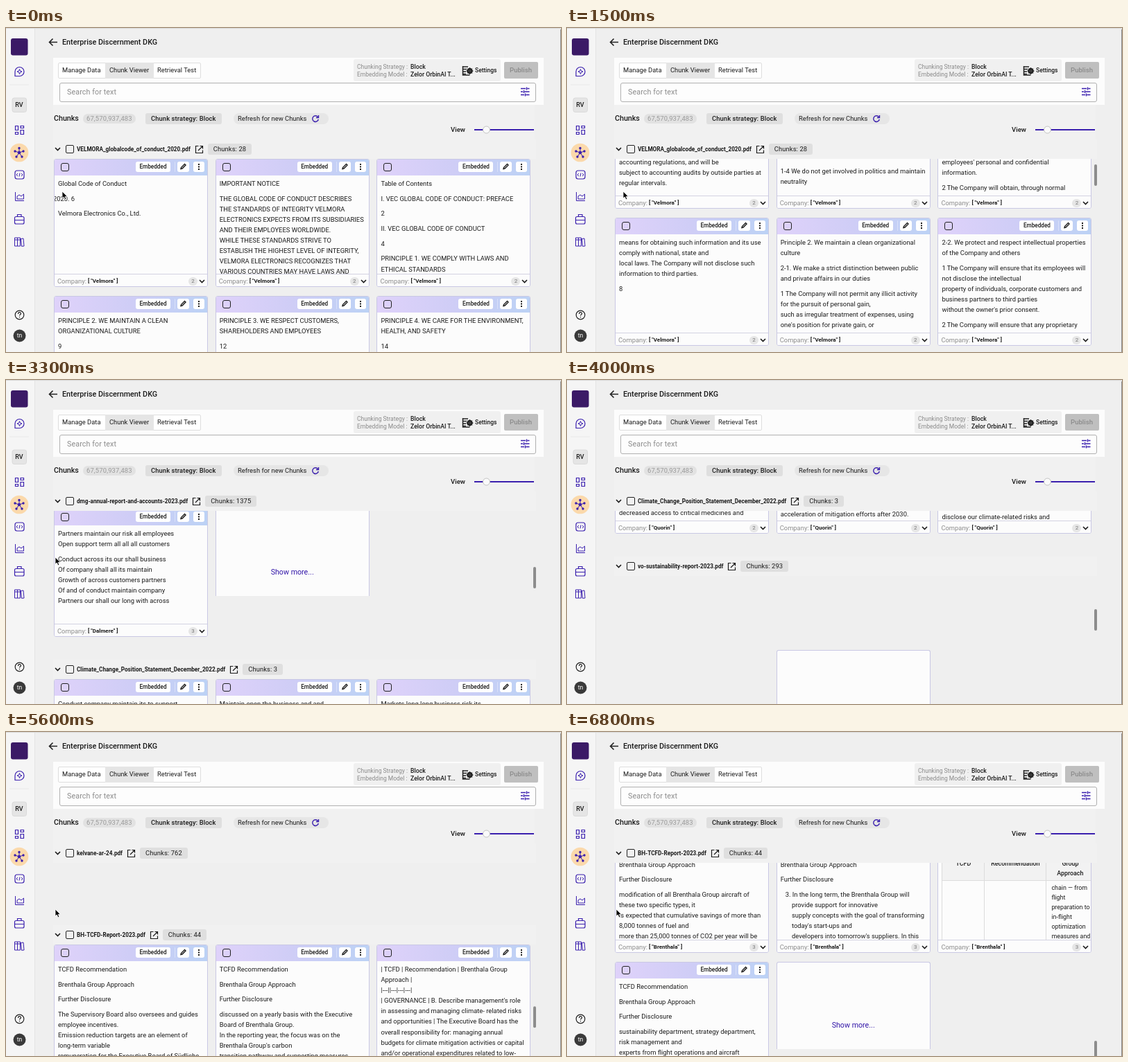
These frames come from a looping animation (800x468 px, 6.9 s). An HTML page:

```html
<!DOCTYPE html>
<html lang="en">
<head>
<meta charset="utf-8">
<title>Chunk viewer</title>
<style>
html, body { margin: 0; width: 100%; height: 100%; overflow: hidden; }
body { position: relative; background: #efefef; color: #1b1b1b; font: 9.4px/12px Roboto, "Open Sans", sans-serif; }
body > *, .box { position: absolute; box-sizing: border-box; white-space: nowrap; }
.m { font-weight: 500; }
.grey { color: #8b8b8b; }
.side { left: 0; top: 0; width: 42px; height: 468px; background: #f5f5f5; border-right: 1px solid #e4e4e4; }
svg { overflow: visible; fill: none; stroke: currentColor; stroke-width: 1.2; }
.art { left: 0; top: 0; width: 800px; height: 468px; }
.view { left: 68px; top: 161px; width: 696px; height: 307px; overflow: hidden; }
.group { position: relative; }
.head { position: sticky; top: 0; z-index: 2; height: 28px; background: #f1f1f1; display: flex; align-items: center; }
.head b { margin: 0 6px 0 4px; font-size: 8.2px; }
.head .chev { margin: 0 7px 0 2px; }
.head .pill { margin-left: 6px; padding: 2px 8px; border-radius: 3px; background: #dfdfdf; letter-spacing: .1px; }
.check { width: 12px; height: 12px; box-sizing: border-box; border: 1.5px solid #222; border-radius: 2px; }
.card, .more { position: absolute; box-sizing: border-box; width: 222px; height: 184.5px; border: 1px solid #c9c8e4; border-radius: 3px; background: #fcfcfc; overflow: hidden; }
.more { height: 126px; border-bottom: 0; border-radius: 3px 3px 0 0; padding-top: 85px; text-align: center; font-size: 10.7px; color: #3216a8; }
.card > * { position: absolute; }
.bar { left: 0; top: 0; width: 220px; height: 22.5px; background: linear-gradient(90deg, #dfd2fa, #cfcdf6 50%, #bcd2f5); }
.bar > * { position: absolute; top: 3px; height: 15px; border-radius: 3px; background: #fff; }
.bar .check { left: 9px; top: 5px; height: 12px; background: none; }
.emb { left: 117px; width: 50px; text-align: center; font: 500 8.2px/15px Roboto, sans-serif; }
.bar .rule { left: 173px; width: 1px; background: #d9e0fa; }
.text { left: 0; top: 27px; width: 215px; height: 138px; padding-left: 5px; overflow: hidden; white-space: pre; line-height: 15.1px; }
.para { margin-bottom: 6.6px; }
.out { margin-left: -7px; }
.foot { left: 0; top: 165px; width: 220px; height: 18px; border-top: 1px solid #d3d2e2; background: #fcfcfc; }
.foot > * { position: absolute; top: 4px; }
.foot b { font-size: 8px; left: 48px; }
.badge { left: 193px; width: 13px; text-align: center; border-radius: 6px; background: #e6e6e6; font-size: 8px; color: #777; }
table { border-collapse: collapse; table-layout: fixed; font-size: 8.9px; line-height: 14px; margin-top: 2px; }
td, th { padding: 0; border: 1px solid #dcdcdc; vertical-align: top; }
th { background: #f2f2f2; font-weight: 500; vertical-align: middle; }
td { height: 180px; padding: 3px 0 0 7px; }
.thumb { left: 759.5px; top: 0; width: 4px; height: 31px; border-radius: 2px; background: #8c8c8c; }
.cursor { left: 0; top: 0; }
</style>
</head>
<body>
<div class="side"></div>
<div class="box" style="left:68px;top:43px;width:707px;height:68px;background:#fcfcfc"></div>
<div class="box" style="left:68px;top:111px;width:694px;height:50px;background:#f1f1f1"></div>
<div class="box" style="left:75px;top:50px;width:206px;height:23px;border:1px solid #dedede;border-radius:2px;background:#fff"></div>
<div class="box" style="left:143px;top:50px;width:70px;height:23px;background:#e5e5e5"></div>
<div class="box" style="left:501px;top:45px;width:212px;height:32px;border-radius:3px;background:#f0f0f0"></div>
<div class="box" style="left:718px;top:49px;width:48.5px;height:24px;border-radius:2px;background:#bfbfbf"></div>
<div class="box" style="left:77px;top:79px;width:687px;height:28px;border:1px solid #b0b0b0;border-radius:3px;background:#fdfdfd"></div>
<div class="box" style="left:111px;top:124px;width:76px;height:14px;border-radius:7px;background:#e2e2e2"></div>
<div class="box" style="left:201px;top:123px;width:110px;height:16px;border-radius:3px;background:#dfdfdf"></div>
<div class="box" style="left:328px;top:123px;width:137px;height:16px;border-radius:8px;background:#e6e6e6"></div>

<span class="m" style="left:81px;top:15px;font-size:10.8px">Enterprise Discernment DKG</span>
<span style="left:81px;top:55px">Manage Data</span>
<span style="left:149px;top:55px">Chunk Viewer</span>
<span style="left:218px;top:55px">Retrieval Test</span>
<span class="grey" style="left:506px;top:50px;font-size:8.5px">Chunking Strategy :</span>
<span class="grey" style="left:506px;top:61px;font-size:8.5px">Embedding Model :</span>
<span class="m" style="left:583px;top:50px;font-size:8.7px">Block</span>
<span class="m" style="left:583px;top:61px;font-size:8.7px">Zelor OrbinAI T...</span>
<span class="m" style="left:676px;top:55px;font-size:8.5px">Settings</span>
<span class="m grey" style="left:726px;top:55px;font-size:9.6px">Publish</span>
<span class="grey" style="left:88px;top:87px;font-size:10.7px;letter-spacing:.1px">Search for text</span>
<span class="m" style="left:69px;top:125px;font-size:10.7px">Chunks</span>
<span class="grey" style="left:116px;top:125px;letter-spacing:.16px;color:#999">67,570,937,483</span>
<span class="m" style="left:209px;top:125px;letter-spacing:.1px">Chunk strategy: Block</span>
<span style="left:334px;top:125px">Refresh for new Chunks</span>
<span class="m" style="left:641px;top:141px;font-size:9.6px">View</span>

<svg class="art" style="color:#3a1fae">
  <rect x="7" y="15" width="24.500" height="24.500" rx="3" fill="#3b1a66" stroke="none"/>
  <rect x="9" y="101" width="20.500" height="20.500" rx="3" fill="#e5e5e5" stroke="#dadada" stroke-width="1"/>
  <path d="M13 69.500v-6.500a6.500 6.500 0 1 1 6.500 6.500z"/>
  <path d="M19.500 59.500l1 2.500 2.500 1-2.500 1-1 2.500-1-2.500-2.500-1 2.500-1z" stroke-width="1"/>
  <path d="M5 82H33" stroke="#e9e9e9" stroke-width="1"/>
  <path d="M13.500 141.500h4v6h-4zM21 141.500h4.500v3H21zM21 147.500h4.500v6H21zM13.500 150.500h4v3h-4z"/>
  <circle cx="19" cy="180" r="13.300" fill="#fbd9ab" stroke="none"/>
  <path d="M19 180V173M19 180l6-2M19 180l4 6M19 180l-4 6M19 180l-6-2" stroke-width="1"/>
  <g fill="currentColor" stroke="none">
    <circle cx="19" cy="180" r="2.300"/><circle cx="19" cy="173.500" r="1.700"/><circle cx="25" cy="178" r="1.700"/>
    <circle cx="23" cy="186" r="1.700"/><circle cx="15" cy="186" r="1.700"/><circle cx="13" cy="178" r="1.700"/>
  </g>
  <rect x="13" y="206" width="13" height="12" rx="3"/>
  <path d="M17 210l-2 2 2 2M22 210l2 2-2 2M20 209.500l-1 5" stroke-width="1"/>
  <path d="M13.500 237v12.500H26M16 247v-4l3-2 3 2 3.500-3v7z" stroke-width="1"/>
  <rect x="12.500" y="272.500" width="13.500" height="10.500" rx="2"/>
  <path d="M16.500 272v-2.500h5.500v2.500M12.500 277.500H26"/>
  <path d="M12.500 303h4v12h-4zM16.500 303h4v12h-4zM21.500 304.500l3.500-.5 1 11-3.500.3zM13 306h7" stroke-width="1"/>
  <g stroke="#222">
    <circle cx="19.500" cy="414.500" r="6.300"/>
    <path d="M17.500 413c0-3 4-3 4-.5 0 1.500-2 1.500-2 3M19.500 417v1.200"/>
    <path d="M74 20.500H62.500M67.500 15.500l-5 5 5 5" stroke-width="1.600"/>
  </g>
  <circle cx="19.500" cy="444.500" r="9" fill="#3a3a3a" stroke="none"/>
  <g stroke="#222" stroke-width="1.500">
    <path d="M659 56h7M659 59.500h5M659 63h4M659 66.500h4"/>
    <circle cx="668.500" cy="62" r="3" stroke-width="2.600"/>
    <path d="M668.500 57v10M663.500 62h10M665 58.500l7 7M672 58.500l-7 7" stroke-width="1"/>
    <path d="M658.500 55v13h10"/>
  </g>
  <path d="M742 87.500h7M751.500 87.500h3M742 92h3M747.500 92h7M742 96.500h5M749.500 96.500h5M750.500 85.500v4M746.500 90v4M748.500 94.500v4" stroke-width="1.400"/>
  <path d="M449.500 128.500a4.300 4.300 0 1 0 .8 3.500M450.500 126v3.500h-3.500" stroke-width="1.400"/>
  <path d="M675 147H761" stroke-width="1.800"/>
  <circle cx="692.500" cy="147" r="5" fill="#fafafa" stroke="#b5b5b5" stroke-width=".8"/>
  <path d="M0 .5H800" stroke="#dadada" stroke-width="1"/>
  <path d="M799.500 2V468" stroke="#8a8a8a" stroke-width="1"/>
</svg>
<span class="m" style="left:9px;top:105px;width:20px;text-align:center;font-size:9px">RV</span>
<span style="left:10px;top:438px;width:19px;text-align:center;font-size:8.5px;color:#fff">tn</span>

<div class="view"></div>
<div class="thumb"></div>
<svg class="cursor" width="9" height="13"><path d="M0 0V10L2.300 8 4 11.800 5.800 11 4.200 7.400H7.300z" fill="#000" stroke="#fff" stroke-width=".8"/></svg>

<script>
// Text marks: "~" new line, "^" new paragraph, "*n" n lines of filler.
const words = ("the company and its employees shall maintain fair open standards of conduct across all " +
  "business areas to support long term growth with our partners customers markets risk").split(" ");
let seed = 7;
const rand = n => (seed = (seed * 16807) % 2147483647) % n;

function fillLine() {
  let line = "";
  while (line.length < 34) line += words[rand(words.length)] + " ";
  return line[0].toUpperCase() + line.slice(1);
}
const lines = n => Array.from({ length: n }, fillLine).join("\n");
const format = s => s.split("^").map(p =>
  `<div class="para">${p.replace(/\*(\d)/g, (_, n) => lines(+n)).replace(/~/g, "\n")}</div>`).join("");

const table = (height, width, title, cell) =>
  `<table style="width:${148 + width}px"><tr style="height:${height}px"><th style="width:60px">TCFD</th>` +
  `<th style="width:88px">Recommendation</th><th>${title}</th></tr><tr><td></td><td></td><td>${cell}</td></tr></table>`;

const approach = "TCFD Recommendation^Brenthala Group Approach^Further Disclosure^";
const annual = "Dalmere Group~2023 Annual Report and Accounts^STRATEGIC~REPORT^FINANCIAL~REVIEW^GOVERNANCE";

const groups = [
  { file: "VELMORA_globalcode_of_conduct_2020.pdf", chunks: 28, company: "Velmora", tags: 2, cards: 28, text: {
    0: "Global Code of Conduct^<span class='out'>2020. 6</span>^Velmora Electronics Co., Ltd.",
    1: "IMPORTANT NOTICE^THE GLOBAL CODE OF CONDUCT DESCRIBES~THE STANDARDS OF INTEGRITY VELMORA~ELECTRONICS EXPECTS FROM ITS SUBSIDIARIES~AND THEIR EMPLOYEES WORLDWIDE.~WHILE THESE STANDARDS STRIVE TO~ESTABLISH THE HIGHEST LEVEL OF INTEGRITY,~VELMORA ELECTRONICS RECOGNIZES THAT~VARIOUS COUNTRIES MAY HAVE LAWS AND",
    2: "Table of Contents^I. VEC GLOBAL CODE OF CONDUCT: PREFACE^2^II. VEC GLOBAL CODE OF CONDUCT^4^PRINCIPLE 1. WE COMPLY WITH LAWS AND~ETHICAL STANDARDS",
    3: "PRINCIPLE 2. WE MAINTAIN A CLEAN~ORGANIZATIONAL CULTURE^9",
    4: "PRINCIPLE 3. WE RESPECT CUSTOMERS,~SHAREHOLDERS AND EMPLOYEES^12",
    5: "PRINCIPLE 4. WE CARE FOR THE ENVIRONMENT,~HEALTH, AND SAFETY^14",
    12: "*2^*3~accounting regulations, and will be~subject to accounting audits by outside parties at~regular intervals.",
    13: "*1^*2^*1~transactions.^1-4 We do not get involved in politics and maintain~neutrality",
    14: "*2^*3~employees' personal and confidential~information.^2 The Company will obtain, through normal",
    15: "means for obtaining such information and its use~comply with national, state and~local laws. The Company will not disclose such~information to third parties.^8",
    16: "Principle 2. We maintain a clean organizational~culture^2-1. We make a strict distinction between public~and private affairs in our duties^1 The Company will not permit any illicit activity~for the pursuit of personal gain,~such as irregular treatment of expenses, using~one's position for private gain, or",
    17: "2-2. We protect and respect intellectual properties~of the Company and others^1 The Company will ensure that its employees will~not disclose the intellectual~property of individuals, corporate customers and~business partners to third parties~without the owner's prior consent.^2 The Company will ensure that any proprietary" } },
  { file: "dmg-annual-report-and-accounts-2023.pdf", chunks: 1375, company: "Dalmere", tags: 3, cards: 10, more: true, text: {
    3: annual, 4: annual,
    5: "Strong financial~performance^Income~£14,752m~(2022: £13,156m)^Profit before tax~£6,178m~(2022: £5,132m)",
    6: "Supporting our customers^*4", 7: "Driving efficiency^*4", 8: "Delivering capital returns^*4" } },
  { file: "Climate_Change_Position_Statement_December_2022.pdf", chunks: 3, company: "Quorin", tags: 2, cards: 3, text: {
    0: "*1^*3^*3~decreased access to critical medicines and",
    1: "*8~acceleration of mitigation efforts after 2030.",
    2: "*1^*2^*2^*2~disclose our climate-related risks and" } },
  { file: "vo-sustainability-report-2023.pdf", chunks: 293, company: "Voreda", tags: 2, cards: 10, more: true, loads: 4100, shell: [107, 126], text: {} },
  { file: "kelvane-ar-24.pdf", chunks: 762, company: "Kelvane", tags: 3, cards: 9, extra: 142, shell: [620, 34], text: {
    6: "Intellectual Capital^Our Intellectual Capital is driven by~agility, flexibility, and innovation.~We are committed to working~with experts, academia, and other~stakeholders to develop new products~and services that meet the needs~of our customers and communities.~With oTRIN, the Tessel Labs, and the",
    7: "Natural Capital^Climate action has been a key focus~area in protecting and preserving~our Natural Capital. We have been at~the forefront of the ESG movement~and became carbon-neutral in 2020,~which was 30 years ahead of the~timeline set by the Lorin Agreement.~Today, we incorporate environmental",
    8: "Manufactured Capital^As strong advocates of environmental~stewardship extending beyond~our boundaries, our Manufactured~Capital includes our energy efficient~offices, data centers, innovation hubs,~digital studios, and our technology~infrastructure across the globe. With~the highest-rated green buildings" } },
  { file: "BH-TCFD-Report-2023.pdf", chunks: 44, company: "Brenthala", tags: 3, cards: 10, more: true, text: {
    0: approach + "The Supervisory Board also oversees and guides~employee incentives.~Emission reduction targets are an element of~long-term variable~remuneration for the Executive Board of Südliche",
    1: approach + "discussed on a yearly basis with the Executive~Board of Brenthala Group.~In the reporting year, the focus was on the~Brenthala Group's carbon~transition pathway and supporting measures",
    2: "| TCFD | Recommendation | Brenthala Group~Approach |~|---||---|---|---|~| GOVERNANCE | B. Describe management's role~in assessing and managing climate- related risks~and opportunities | The Executive Board has the~overall responsibility for: managing annual~budgets for climate mitigation activities or capital~and/or operational expenditures related to low-",
    3: approach + "and will be brought to the attention of~management through established~governance processes.",
    4: table(36, 86, "Brenthala Group\nApproach", "Group companies\nand relevant\nGroup functions.\nThe Sustainability\nCircle holds"),
    5: approach + "Within the Brenthala Group risks are reviewed~quarterly and developed as~part of the corporate risk management",
    6: approach + "modification of all Brenthala Group aircraft of~these two specific types, it~is expected that cumulative savings of more than~8,000 tonnes of fuel and~more than 25,000 tonnes of CO2 per year will be",
    7: approach + "   3. In the long term, the Brenthala Group will~       provide support for innovative~       supply concepts with the goal of transforming~       today's start-ups and~       developers into tomorrow's suppliers. In this",
    8: table(50, 72, "Brenthala\nGroup\nApproach", "chain — from\nflight\npreparation to\nin-flight\noptimization\nmeasures and"),
    9: approach + "sustainability department, strategy department,~risk management and~experts from flight operations and aircraft" } }
];

const icon = (w, h, d, cls = "", style = "") => `<svg class="${cls}" width="${w}" height="${h}" style="${style}"><path d="${d}"/></svg>`;
const chevron = (cls, style) => icon(9, 6, "M1 1L4.500 4.500 8 1", cls, "stroke-width:1.600;" + style);
const place = i => `left:${1 + (i % 3) * 232.7}px;top:${28 + Math.floor(i / 3) * 198}px`;

function card(g, i) {
  return `<div class="card" style="${place(i)}"><div class="bar"><i class="check"></i><span class="emb">Embedded</span><i class="rule"></i>` +
    icon(17, 15, "M5 10.500L5.500 8.500 10.500 3.500 12 5 7 10z", "", "left:177px;stroke-width:1.400") +
    icon(16, 15, "M8 3v2M8 6.500v2M8 10v2", "", "left:200px;stroke-width:2") +
    `</div><div class="text">${format(g.text[i] || "*2^*5")}</div>` +
    `<div class="foot"><span class="grey" style="left:4px">Company:</span><b>[ "${g.company}" ]</b>` +
    `<span class="badge">${g.tags}</span>${chevron("", "left:208px;top:7px")}</div></div>`;
}

function build(g) {
  const height = Math.ceil(g.cards / 3) * 198 + 48 + (g.extra || 0);
  const cards = Array.from({ length: g.cards }, (_, i) => card(g, i)).join("");
  const more = g.more ? `<div class="more" style="${place(g.cards)}">Show more...</div>` : "";
  const shell = g.shell ? `<div class="more shell" style="left:233.7px;top:${28 + g.shell[0]}px;height:${g.shell[1]}px;padding:0"></div>` : "";
  return `<div class="group" style="height:${height}px"><div class="head">${chevron("chev", "")}<i class="check"></i><b>${g.file}</b>` +
    icon(13, 13, "M5.500 1.500H1.500V11.500H11.500V7.500M7.500 1.500H11.500V5.500M11.500 1.500L5 8") +
    `<span class="pill">Chunks: ${g.chunks}</span></div><div class="rows">${cards}${more}</div>${shell}</div>`;
}

const $ = s => document.querySelector(s);
const view = $(".view"), thumb = $(".thumb"), cursor = $(".cursor");
view.innerHTML = groups.map(build).join("");
const late = groups.findIndex(g => g.loads);
const lateRows = view.children[late].querySelector(".rows");
const lateShell = view.children[late].querySelector(".shell");

// Time in ms, list scroll, scrollbar top
const path = [
  [0, 0, 189], [200, 0, 189], [1500, 905, 197], [2100, 2034, 210], [2500, 2193, 214], [2900, 2400, 235],
  [4000, 3020, 331], [5000, 4407, 369], [6100, 4798, 419], [6800, 5189, 446], [6900, 5189, 446]
];

function at(t, col) {
  const i = path.findIndex(p => p[0] > t);
  const a = path[i - 1], b = path[i];
  return a[col] + (b[col] - a[col]) * (t - a[0]) / (b[0] - a[0]);
}

const start = performance.now();
function draw() {
  const t = Math.floor((performance.now() - start) % 6900 / 100) * 100;
  const loaded = t >= groups[late].loads;
  const move = Math.min(1, Math.max(0, (t - 1500) / 500));
  lateRows.style.visibility = loaded ? "visible" : "hidden";
  lateShell.style.visibility = loaded ? "hidden" : "visible";
  view.scrollTop = at(t, 1);
  thumb.style.opacity = t > 200 ? 1 : 0;
  thumb.style.transform = `translateY(${at(t, 2)}px)`;
  cursor.style.transform = `translate(${81 - 10 * move}px, ${236 + 20 * move}px)`;
  requestAnimationFrame(draw);
}
draw();
</script>
</body>
</html>
```
